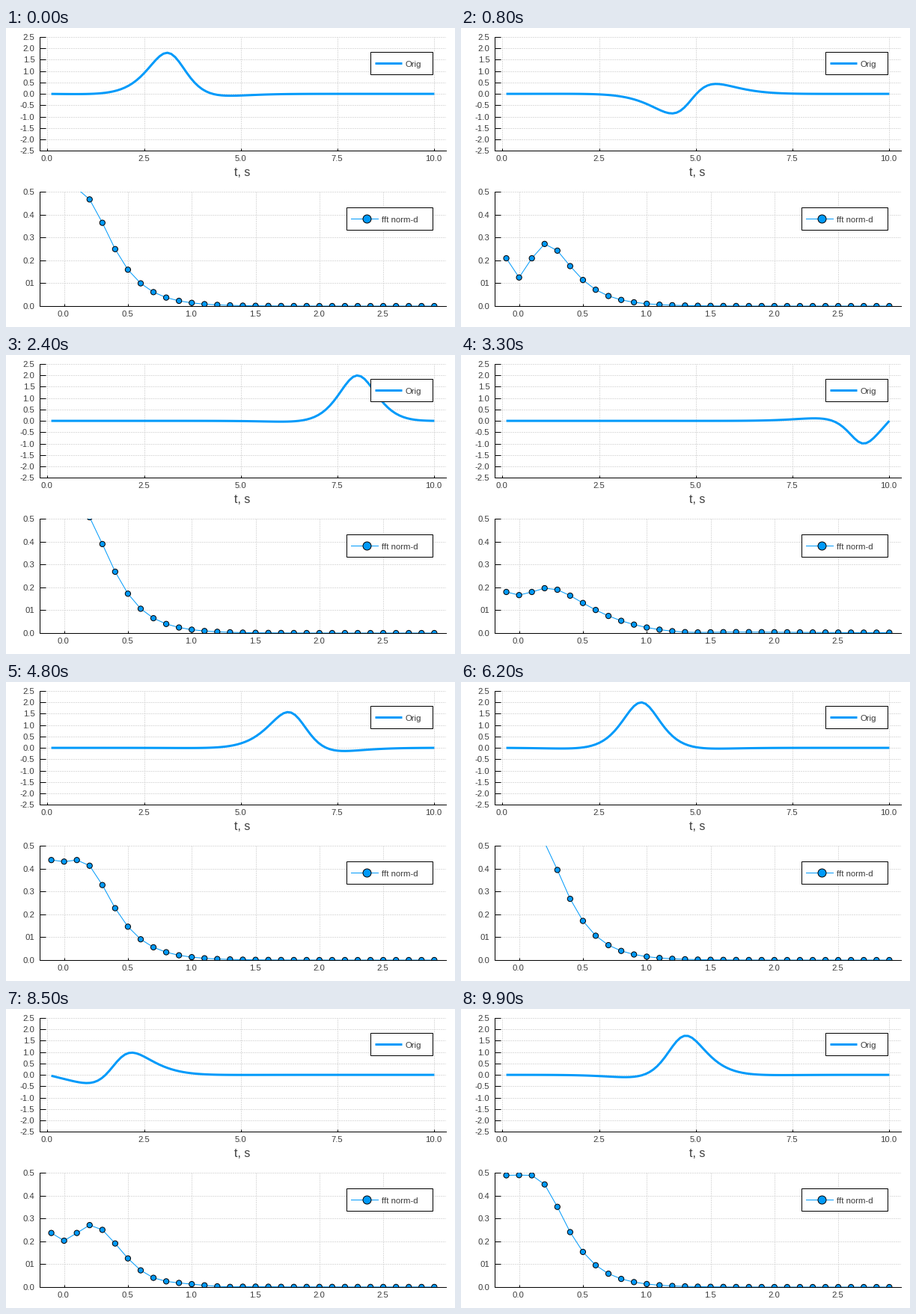
Recreate the animation shown at these times as a matplotlib script. Size 600 by 400 pixels, loop 10000 ms.

```python
import numpy as np
import matplotlib.pyplot as plt
from matplotlib.animation import FuncAnimation
from matplotlib.patches import Rectangle

W, H, DPI = 600, 400, 100
PT = 72 / DPI
FRAMES = 100
BLUE, INK = "#009afa", "#3c3c3c"
plt.rcParams["font.family"] = "Liberation Sans"

# Soliton of the nonlinear Schroedinger equation in a box with fixed walls,
# solved by split steps on the odd periodic extension of the box.
L, STEP, SUB = 10.0, 0.2, 40
x = np.arange(200) * 0.1
k = 2 * np.pi * np.fft.fftfreq(x.size, 0.1)


def soliton(s):
    return 2 / np.cosh(2 * (s - 3)) * np.exp(1j * (s - 3))


def evolve():
    dt = STEP / SUB
    half = np.exp(-0.25j * k**2 * dt)
    wall = np.exp(-0.0025 * dt * np.exp(-np.minimum(x, 2 * L - x)**2))
    q = soliton(x) - soliton(-x) - soliton(2 * L - x) + soliton(x - 2 * L)
    waves = []
    for _ in range(FRAMES):
        for _ in range(SUB):
            q = np.fft.ifft(half * np.fft.fft(q))
            q = q * wall * np.exp(1j * np.abs(q)**2 * dt)
            q = np.fft.ifft(half * np.fft.fft(q))
        waves.append(q.real[1:101].copy())
    return waves


waves = evolve()
spectra = [np.roll(np.abs(np.fft.fft(w)), 1)[:31] / 40 for w in waves]
freqs = np.arange(-1, 30) * 0.1

fig = plt.figure(figsize=(W / DPI, H / DPI), dpi=DPI, facecolor="white")


def text(px, py, s, size=11.2, ha="center"):
    fig.text(px / W, 1 - py / H, s, fontsize=size * PT, ha=ha,
             va="baseline", color=INK, zorder=10)


def panel(top, bottom, xlim, ylim, xticks, yticks):
    left, right = 45.2, 587.7
    ax = fig.add_axes([left / W, 1 - bottom / H,
                       (right - left) / W, (bottom - top) / H])
    ax.set(xlim=xlim, ylim=ylim, xticks=xticks, yticks=yticks)
    ax.set_axisbelow(True)
    ax.grid(color="#d4d4d4", lw=0.8 * PT, ls=(0, (2.5, 1.2)))
    for side in ("top", "right"):
        ax.spines[side].set_visible(False)
    for side in ("left", "bottom"):
        ax.spines[side].set_linewidth(PT)
    ax.tick_params(direction="in", width=PT, labelbottom=False, labelleft=False)
    ax.tick_params(axis="x", length=3.5 * PT)
    ax.tick_params(axis="y", length=8 * PT)
    for t in xticks:
        px = left + (t - xlim[0]) / (xlim[1] - xlim[0]) * (right - left)
        text(px - 0.7, bottom + 13.5, f"{t:.1f}")
    for t in yticks:
        py = bottom - (t - ylim[0]) / (ylim[1] - ylim[0]) * (bottom - top)
        label = f"{t:.1f}".replace("0.1", "01")
        text(38.4, py + 4, label, ha="right")
    return ax


def legend(x0, y0, x1, y1, label, **style):
    box = Rectangle((x0 / W, 1 - y1 / H), (x1 - x0) / W, (y1 - y0) / H,
                    transform=fig.transFigure, fc="white", ec="black",
                    lw=PT, zorder=8)
    fig.add_artist(box)
    y = 1 - (y0 + y1) / 2 / H
    fig.add_artist(plt.Line2D([(x0 + 6) / W, (x0 + 42) / W], [y, y],
                              color=BLUE, zorder=9, **style))
    text(x0 + 47, (y0 + y1) / 2 + 4.5, label, 11.4, "left")


top = panel(12, 164.2, (-0.197, 10.297), (-2.5, 2.5),
            np.arange(5) * 2.5, np.arange(-5, 6) * 0.5)
low = panel(219.2, 372, (-0.19, 2.99), (0, 0.5),
            np.arange(6) * 0.5, np.arange(6) * 0.1)
text(315.2, 198, "t, s", 16)

legend(487, 32, 570, 62, "Orig", lw=3 * PT, solid_capstyle="butt")
legend(455, 240, 570, 270, "fft norm-d", lw=PT)
fig.add_artist(plt.Line2D([482 / W], [1 - 255 / H], marker="o", ms=11 * PT,
                          mfc=BLUE, mec="black", mew=PT, zorder=10))

wave, = top.plot(x[1:101], waves[0], color=BLUE, lw=3 * PT,
                 solid_capstyle="butt")
spec, = low.plot(freqs, spectra[0], color=BLUE, lw=PT)
# A size per dot keeps the dots off the pixel grid.
dots = low.scatter(freqs, spectra[0], s=np.full(freqs.size, (7.2 * PT)**2),
                   c=BLUE, edgecolors="black", linewidths=PT, zorder=2.2)


def draw(n):
    wave.set_ydata(waves[n])
    spec.set_ydata(spectra[n])
    dots.set_offsets(np.column_stack([freqs, spectra[n]]))
    return wave, spec, dots


anim = FuncAnimation(fig, draw, frames=FRAMES, interval=100,
                     repeat=True, repeat_delay=0)
plt.show()
```
